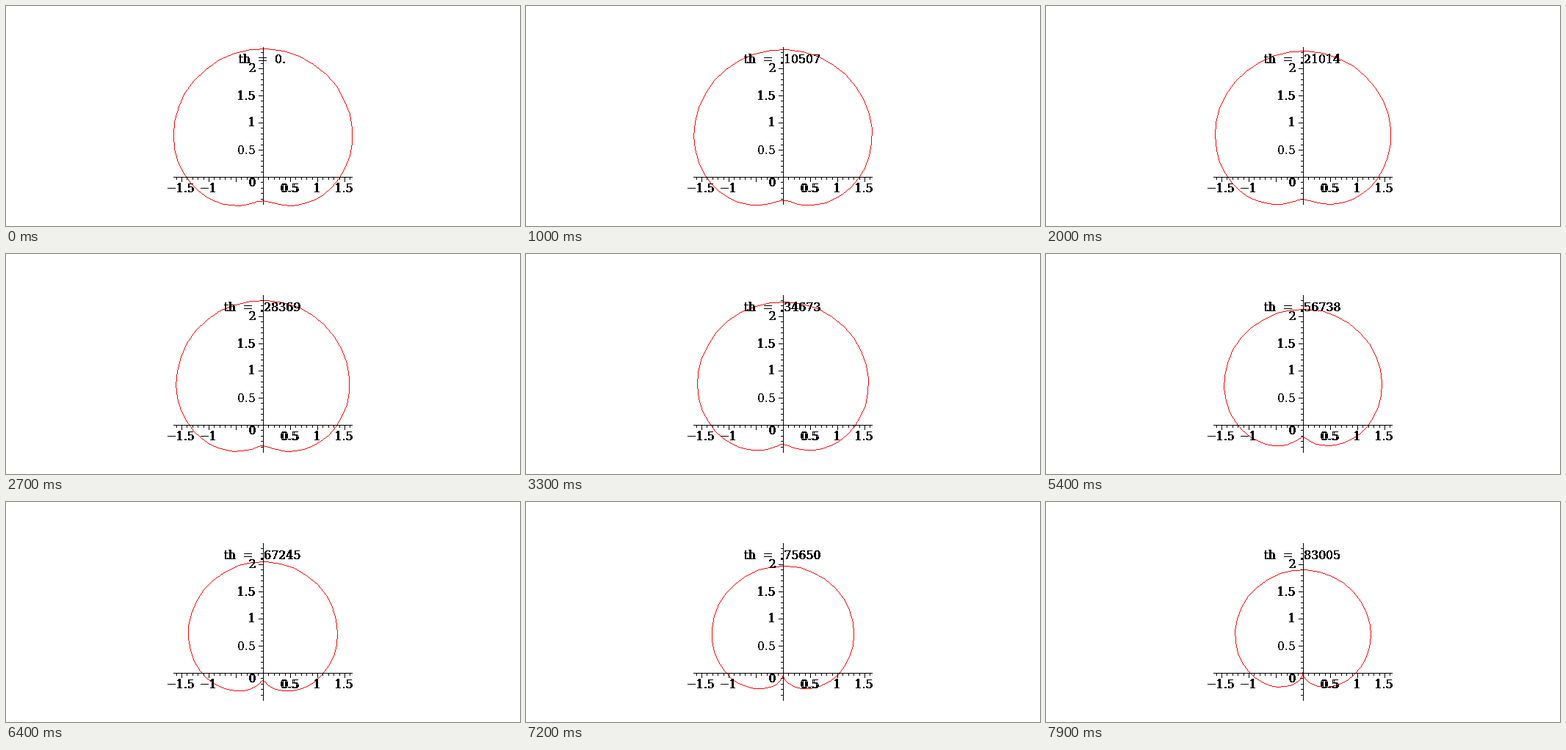
A matplotlib script that plays this animation: 700 by 300 pixels, repeating every 8 s.

```python
import numpy as np
import matplotlib.pyplot as plt
from matplotlib.animation import FuncAnimation

W, H, DPI = 700, 300, 100
FRAMES, INTERVAL = 80, 100
STEP = np.pi / 299
AX, AY, UNIT = 350, 233, 74            # axes: origin and pixels per unit
CX, CY, SCALE = 349.5, 235.0, 73.2     # curve: origin and scale
BLACK, RED = (0, 0, 0), (255, 0, 0)

fig = plt.figure(figsize=(W / DPI, H / DPI), dpi=DPI, facecolor="white")
ax = fig.add_axes([0, 0, 1, 1])
ax.axis("off")
canvas = np.full((H, W, 3), 255, np.uint8)
picture = ax.imshow(canvas, extent=(0, W, H, 0), aspect="auto",
                    interpolation="nearest")


def nearest(v):
    return np.floor(np.asarray(v) + 0.5).astype(int)


def line(img, x0, y0, x1, y1, color):
    """Hard one-pixel line between two pixels."""
    n = max(abs(x1 - x0), abs(y1 - y0)) + 1
    img[nearest(np.linspace(y0, y1, n)), nearest(np.linspace(x0, x1, n))] = color


def draw_axes(img):
    line(img, 228, AY, 471, AY, BLACK)
    line(img, AX, 56, AX, 270, BLACK)
    for k in range(-16, 17):
        x = AX + round(k * UNIT / 10)
        line(img, x, AY, x, AY + (6 if k % 5 == 0 else 3), BLACK)
    for k in range(-4, 24):
        y = AY - round(k * UNIT / 10)
        line(img, AX - (6 if k % 5 == 0 else 3), y, AX, y, BLACK)


def label(x, y, s, ha="center"):
    """Hard-edged text, struck twice one pixel apart for weight."""
    pair = [ax.text(x - dx, y, s, ha=ha, va="center_baseline",
                    fontsize=15.7 * 72 / DPI, family="DejaVu Serif")
            for dx in (0, 1)]
    for t in pair:
        t.set_antialiased(False)
    return pair


def short_float(v):
    """Five significant digits without a leading zero."""
    if v == 0:
        return "0."
    if v < 0.1:
        return f"{v * 10:.5f}"[1:] + "e-1"
    return f"{v:.5f}"[1:]


for v in (-1.5, -1, 0.5, 1, 1.5):
    label(AX + v * UNIT, 247.5, f"{v:g}".replace("-", "\u2212"))
for v in (0.5, 1, 1.5, 2):
    label(340.5, AY - 1 - v * UNIT, f"{v:g}", "right")
label(340.5, 239.5, "0", "right")
title = label(349.5, 71.5, "")

t = np.linspace(0, 2 * np.pi, 50)


def update(i):
    th = i * STEP
    r = np.sqrt(2) * np.cos(th) + np.sin(t)
    x = nearest(CX + SCALE * r * np.cos(t))
    y = nearest(CY - SCALE * r * np.sin(t))
    img = canvas.copy()
    for seg in zip(x, y, x[1:], y[1:]):
        line(img, *seg, RED)
    draw_axes(img)
    picture.set_data(img)
    for part in title:
        part.set_text("th  =  " + short_float(th))
    return picture, *title


anim = FuncAnimation(fig, update, frames=FRAMES, interval=INTERVAL,
                     repeat=True, repeat_delay=0, blit=False)
plt.show()
```
